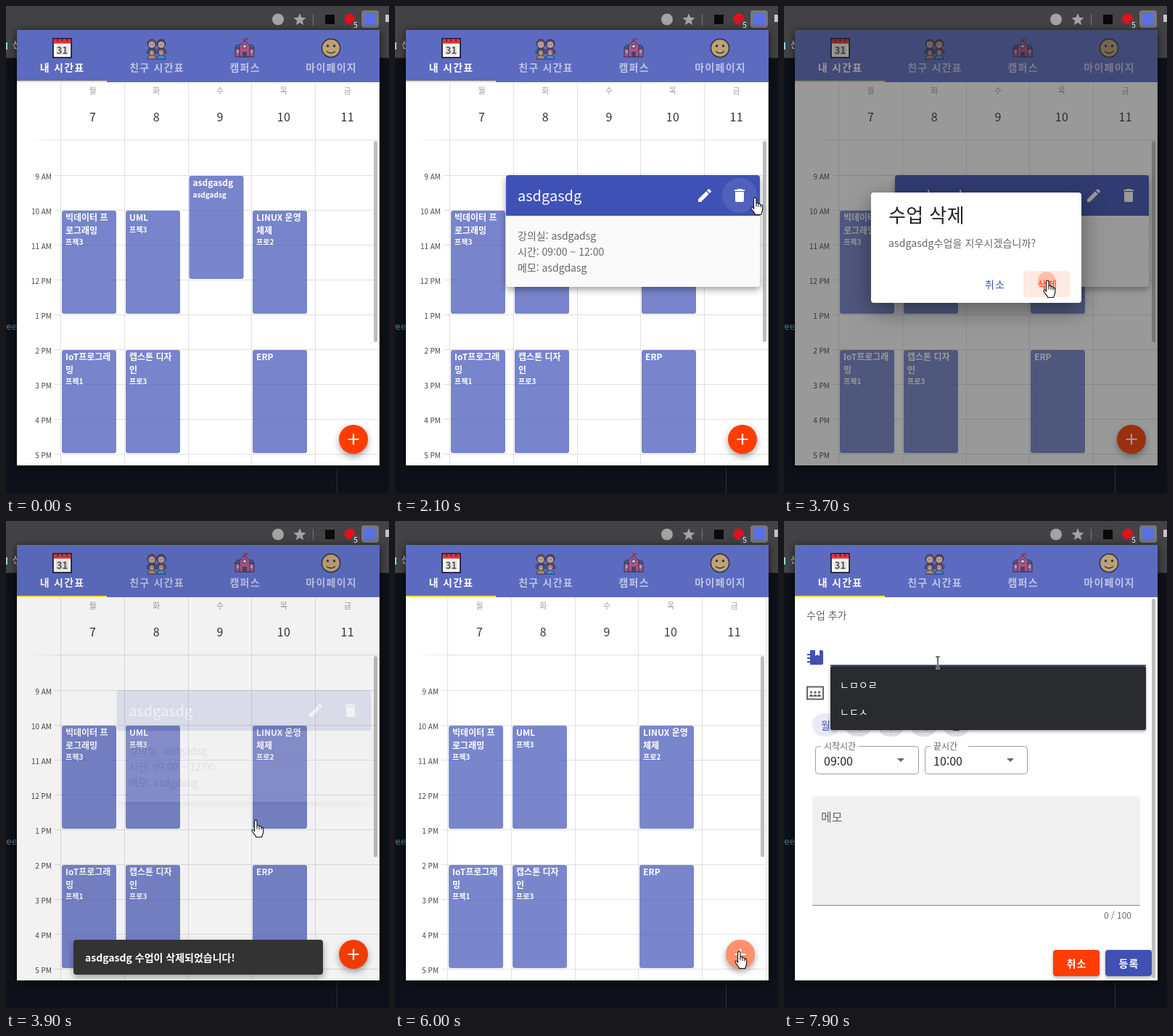
Write an HTML page that moves like this. It is 528x671 px and loops after 8 s.

```html
<!DOCTYPE html>
<html lang="ko">
<head>
<meta charset="utf-8">
<title>시간표</title>
<style>
  html, body { margin: 0; width: 100%; height: 100%; overflow: hidden; background: #0e1119; }
  svg { display: block; width: 528px; height: 671px; font-family: "Noto Sans CJK KR", "Noto Sans CJK JP", "Noto Sans", sans-serif; }
  text { white-space: pre; }
  .low { filter: drop-shadow(0 2px 2px rgba(0,0,0,.35)); }
  .mid { filter: drop-shadow(0 4px 5px rgba(0,0,0,.36)); }
  .high { filter: drop-shadow(0 10px 16px rgba(0,0,0,.42)); }
</style>
</head>
<body>
<svg id="stage" viewBox="0 0 528 671" xmlns="http://www.w3.org/2000/svg"></svg>
<script>
const LOOP = 8000, STEP = 100;
const BLUE = '#3f51b5', ORANGE = '#ff3d00';

// Markup helpers
const rect = (x, y, w, h, fill, more = '') =>
  `<rect x="${x}" y="${y}" width="${w}" height="${h}" fill="${fill}" ${more}/>`;
const circle = (x, y, r, fill, more = '') =>
  `<circle cx="${x}" cy="${y}" r="${r}" fill="${fill}" ${more}/>`;
const path = (d, fill, more = '') => `<path d="${d}" fill="${fill}" ${more}/>`;
const stroke = (d, color, width = 1, more = '') =>
  `<path d="${d}" fill="none" stroke="${color}" stroke-width="${width}" ${more}/>`;
const group = (inner, more = '') => `<g ${more}>${inner}</g>`;
// y is the optical middle of the line
const text = (s, x, y, size, fill, more = '') =>
  `<text x="${x}" y="${(y + size * 0.36).toFixed(2)}" font-size="${size}" fill="${fill}" ${more}>${s}</text>`;
const MID = 'text-anchor="middle"', END = 'text-anchor="end"', BOLD = 'font-weight="700"';

function browser() {
  const star = Array.from({ length: 10 }, (_, i) => {
    const a = i * Math.PI / 5 - Math.PI / 2, r = i % 2 ? 3.9 : 9;
    return `${(405 + r * Math.cos(a)).toFixed(1)} ${(19 + r * Math.sin(a)).toFixed(1)}`;
  }).join('L');
  return rect(0, 0, 528, 671, '#0e1119') +
    rect(0, 0, 528, 72, '#434345') + rect(0, 71, 528, 1, '#2a2a2c') +
    circle(375, 18.5, 8, '#a3a3a4') + path(`M${star}Z`, '#a3a3a4') +
    rect(423, 11, 1, 16, '#77777a') + rect(440, 12, 13, 13, '#0a0a0a') +
    circle(474, 18, 7.5, '#e3101c') + rect(476, 20, 12, 12, '#4a4a4d', 'rx="2"') +
    text('5', 482, 26, 10, '#fff', MID) +
    rect(490, 6, 24, 24, '#77787c', 'rx="4"') + rect(494, 10, 16, 16, '#5a70e6') +
    rect(523, 12, 6, 10, '#c4c4c4') +
    rect(0, 50, 2, 10, '#8fd0e8') + text('선', 9, 54, 12, '#f0f0f0') +
    `<text x="15" y="446" font-size="12" fill="#557f95" text-anchor="end" font-family="'Noto Sans Mono', monospace">wee</text>` +
    rect(456, 633, 1, 38, '#2b3040');
}

// Tab pictograms, each centred on 0,0
function calendarIcon() {
  return rect(-12, -13, 25, 26, '#fff', 'stroke="#111" stroke-width="1.6"') +
    rect(-11.2, -12.2, 23.4, 6, '#e8323c') +
    stroke('M-6 -14V-9M0.5 -14V-9M7 -14V-9', '#222', 1.2) +
    rect(-8, -3.5, 17, 13, '#e6e6e6') + text('31', 0.5, 3, 13, '#555', MID + ' ' + BOLD);
}
function familyIcon() {
  const head = (x, y, r, hair, skin, shirt) =>
    path(`M${x - r - 1} ${y + r * 2.2}q0 ${-r * 1.2} ${r + 1} ${-r * 1.2}t${r + 1} ${r * 1.2}z`, shirt, 'stroke="#111"') +
    circle(x, y, r, hair, 'stroke="#111"') + circle(x, y + 1.4, r - 1.6, skin) +
    path(`M${x - 2} ${y + 1}h1m2 0h1`, 'none', 'stroke="#111"');
  return head(-6.5, -6, 6, '#6b3a22', '#ffc27a', '#2f8f9d') +
    head(6.5, -6, 6, '#4a2a1c', '#ffc27a', '#c9433c') +
    head(-6.5, 5, 4.6, '#5b3320', '#ffc27a', '#e0a030') +
    head(6.5, 5, 4.6, '#8a4a20', '#ffc27a', '#3a9cd8');
}
function schoolIcon() {
  return rect(-13, 0, 26, 12, '#d8425a', 'stroke="#111"') +
    path('M-13 0L-11 -4H11L13 0Z', '#4a5a74', 'stroke="#111"') +
    path('M-7 12V-4L0 -10L7 -4V12Z', '#e4455a', 'stroke="#111"') +
    stroke('M0 -10V-14', '#111', 1.4) + rect(0, -14, 5, 3, '#e81224') +
    circle(0, -2.5, 2.6, '#fff', 'stroke="#111"') + rect(-3, 5, 6, 7, '#3b2a2a') +
    path('M-11 3h3v4h-3zM8 3h3v4h-3z', '#9fd8f4');
}
function smileIcon() {
  return circle(0, 0, 12.6, '#ffc83d', 'stroke="#111" stroke-width="1.6"') +
    circle(-4.5, -3, 1.8, '#111') + circle(4.5, -3, 1.8, '#111') +
    stroke('M-6 4.5Q0 9.5 6 4.5', '#111', 1.5);
}

function header() {
  const tabs = [['내 시간표', 77, calendarIcon], ['친구 시간표', 207.5, familyIcon],
                ['캠퍼스', 329, schoolIcon], ['마이페이지', 448, smileIcon]];
  return rect(15, 33, 500, 72, '#5c6bc0') + tabs.map(([name, x, icon], i) =>
    group(group(icon(), `transform="translate(${x} 58)"`) +
      text(name, x + 0.6, 84.5, 14, '#fff', `${MID} ${BOLD} letter-spacing="1.25"`),
      `opacity="${i ? 0.6 : 1}"`)).join('') +
    rect(15, 103, 124, 2, '#ffeb3b');
}

function lesson(x, y, lines, sub) {
  return rect(x, y, 75, 142, BLUE, 'rx="3" fill-opacity=".7"') +
    lines.map((s, i) => text(s, x + 5, y + 9.5 + i * 18, 12, '#fff', BOLD)).join('') +
    text(sub, x + 5, y + 8.5 + lines.length * 17.5, 10, '#fff', BOLD);
}

function timetable() {
  const cols = [75.5, 163.5, 251.5, 338.5, 426.5, 514.5];
  const hours = ['9 AM', '10 AM', '11 AM', '12 PM', '1 PM', '2 PM', '3 PM', '4 PM', '5 PM'];
  let s = cols.map(x => stroke(`M${x} 106V633`, '#e0e0e0')).join('');
  s += stroke('M75 184.5H515', '#e0e0e0') + rect(31, 184, 44, 1, 'url(#fade)');
  s += [...'월화수목금'].map((d, i) =>
    text(d, 119.5 + i * 87.8, 117.5, 11, '#9e9e9e', MID) +
    text(7 + i, 119.5 + i * 87.8, 153.5, 16, '#333', MID + ' letter-spacing=".3"')).join('');
  s += hours.map((h, i) => stroke(`M67 ${233.5 + i * 48}H515`, '#e0e0e0') +
    text(h, 63, 235 + i * 48, 10, '#424242', END)).join('');
  s += lesson(77, 282, ['빅데이터 프', '로그래밍'], '프젝3') +
    lesson(165, 282, ['UML'], '프젝3') +
    lesson(340, 282, ['LINUX 운영', '체제'], '프로2') +
    lesson(77, 474, ['IoT프로그래', '밍'], '프젝1') +
    lesson(165, 474, ['캡스톤 디자', '인'], '프로3') +
    lesson(340, 474, ['ERP'], '') +
    group(lesson(252.5, 234, ['asdgasdg'], 'asdgadsg'), 'id="doomed"');
  s += rect(507, 186, 5, 277, '#bdbdbd', 'rx="2.5"');
  s += group(circle(479, 597, 20, ORANGE), 'class="mid"') +
    circle(479, 597, 20, '#fff', 'id="fabGlow"') +
    stroke('M471.5 597H486.5M479 589.5V604.5', '#fff', 2.2);
  return s;
}

function card() {
  return group(rect(153, 233, 350, 154, '#fafafa', 'rx="4"') +
      path('M153 289V237a4 4 0 0 1 4-4H499a4 4 0 0 1 4 4V289Z', BLUE), 'class="mid"') +
    circle(475, 261, 24, '#fff', 'id="binHover" fill-opacity=".09"') +
    text('asdgasdg', 169, 262, 20, '#fff') +
    path('M418 266.2V270h3.8L432.8 259l-3.8-3.8ZM430 254.2l3.8 3.8 1.9-1.9q.6-.7 0-1.3l-2.5-2.5q-.6-.6-1.3 0Z', '#fff') +
    path('M469 268a2 2 0 0 0 2 2h8a2 2 0 0 0 2-2V256H469ZM482 253h-3.5l-1-1h-5l-1 1H468v2h14Z', '#fff') +
    ['강의실: asdgadsg', '시간: 09:00 ~ 12:00', '메모: asdgdasg']
      .map((s, i) => text(s, 169, 317 + i * 22, 14, '#666')).join('');
}

function dialog() {
  return group(rect(120, 257, 290, 152, '#fff', 'rx="4"'), 'class="high"') +
    text('수업 삭제', 144, 289, 26, '#212121', 'letter-spacing=".4"') +
    text('asdgasdg수업을 지우시겠습니까?', 144, 327, 14, '#666', 'letter-spacing=".1"') +
    text('취소', 277, 384, 14, BLUE, 'font-weight="500" letter-spacing="1.25"') +
    rect(330, 365, 64, 36, ORANGE, 'id="okHover" rx="4" fill-opacity=".11"') +
    text('삭제', 349, 384, 14, ORANGE, 'font-weight="500" letter-spacing="1.25"') +
    circle(362, 378, 12, ORANGE, 'id="okRipple" fill-opacity=".25"');
}

function snackbar() {
  return group(rect(93, 577, 344, 48, '#333', 'rx="4"'), 'class="mid"') +
    text('asdgasdg 수업이 삭제되었습니다!', 109, 602, 14, '#fff', BOLD);
}

function select(x, w, label, value) {
  return rect(x + 0.5, 310.5, w, 38, '#fff', 'rx="4" stroke="#9e9e9e"') +
    rect(x + 8, 309, 52, 4, '#fff') + text(label, x + 12, 311, 12, '#666') +
    text(value, x + 12, 331, 16, '#222') +
    path(`M${x + 113} 327h10l-5 5z`, '#666');
}

function button(x, fill, label) {
  return group(rect(x, 591, 64, 36, fill, 'rx="4"'), 'class="low"') +
    text(label, x + 32.6, 609.5, 14, '#fff', `${MID} ${BOLD} letter-spacing="1.25"`);
}

function form() {
  const chips = [...'월화수목금'].map((d, i) => {
    const x = 57.5 + i * 45;
    return rect(x - 18.5, 265, 37, 32, i ? '#e0e0e0' : '#e8eaf6', 'rx="16"') +
      text(d, x, 281.5, 14, i ? '#444' : BLUE, MID);
  }).join('');
  const book = path('M36 178H52a2 2 0 0 1 2 2V196a2 2 0 0 1-2 2H36v-3h-4v-2h4v-3h-4v-2h4v-3h-4v-2h4ZM43 178v8l3-2 3 2v-8Z',
    '#666', 'id="book" fill-rule="evenodd"');
  const room = rect(32, 228.5, 22, 17, 'none', 'stroke="#666" stroke-width="2"') +
    [37.5, 43, 48.5].map(x => circle(x, 236, 1.7, '#666') +
      path(`M${x - 2.6} 242q0-3 2.6-3t2.6 3z`, '#666')).join('');
  return text('수업 추가', 31, 130, 14, '#666') + book + room +
    group(text('수업명(필수)', 64, 188, 16, '#666'), 'id="hint"') +
    rect(64, 199, 435, 1, '#949494') + text('0 / 10', 499, 209.5, 12, '#666', END) +
    text('강의실', 64, 237, 16, '#666') +
    rect(64, 247, 435, 1, '#949494') + text('0 / 10', 499, 257.5, 12, '#666', END) +
    chips + select(43, 142, '시작시간', '09:00') + select(194, 141, '끝시간', '10:00') +
    path('M39 529V383a4 4 0 0 1 4-4H487a4 4 0 0 1 4 4V529Z', '#f0f0f0') +
    rect(39, 529, 452, 1, '#8c8c8c') + text('메모', 51, 408, 16, '#666') +
    text('0 / 100', 479, 544, 12, '#666', END) +
    button(371, ORANGE, '취소') + button(443, BLUE, '등록') +
    rect(507, 107, 5, 523, '#bdbdbd', 'rx="2.5"') +
    rect(64, 198, 435, 2, BLUE, 'id="focusLine"') +
    group(group(rect(64, 200, 435, 88, '#2a2b2e', 'rx="2"'), 'class="low"') +
      text('ㄴㅁㅇㄹ', 77, 226, 14, '#fff') + text('ㄴㄷㅅ', 77, 263, 14, '#fff'), 'id="options"');
}

function pointer() {
  const ink = 'stroke="#111" stroke-width="1.1" stroke-linejoin="round"';
  const beam = 'M-3 -8h2l1 1 1 -1h2M0 -7V7M-3 8h2l1 -1 1 1h2';
  return path('M0 0V16.5L3.8 13L6.3 19L9 17.8L6.5 12H11.5Z', '#fff', ink + ' id="arrow"') +
    group(path('M4.6 2.3a1.7 1.7 0 0 1 3.4 0V9.2a1.5 1.5 0 0 1 3 .2v1a1.5 1.5 0 0 1 3 .3v1a1.4 1.4 0 0 1 2.7.5V17c0 3-1.9 4-1.9 7H6.6c0-3-4.8-6-5.6-8.8-.4-1.8 1.6-2.3 2.4-1L4.6 16Z', '#fff', ink) +
      stroke('M8 9.5V13M11 11V13.5M14 12V14', '#111'), 'id="hand" transform="translate(-6 -.5)"') +
    group(stroke(beam, '#fff', 2.5) + stroke(beam, '#111', 1.2), 'id="beam"');
}

const stage = document.getElementById('stage');
stage.innerHTML =
  `<defs><clipPath id="view"><rect x="15" y="105" width="500" height="528"/></clipPath>
   <linearGradient id="fade"><stop offset="0" stop-color="#fff"/><stop offset="1" stop-color="#e0e0e0"/></linearGradient></defs>` +
  browser() +
  group(rect(15, 33, 500, 600, '#fff'), 'style="filter:drop-shadow(0 2px 6px rgba(0,0,0,.7))"') +
  group(group(timetable(), 'id="table"') + group(form(), 'id="form"'), 'clip-path="url(#view)"') +
  header() +
  group(card(), 'id="card"') +
  rect(15, 33, 500, 600, '#212121', 'id="shade"') +
  group(dialog(), 'id="dialog"') + group(snackbar(), 'id="snack"') +
  group(pointer(), 'id="cursor"');

const el = {};
stage.querySelectorAll('[id]').forEach(n => el[n.id] = n);

// Motion helpers
const ramp = (t, a, b) => Math.min(1, Math.max(0, (t - a) / (b - a)));
const during = (t, a, b) => t >= a && t < b;
const fade = (node, o) => {
  node.setAttribute('opacity', o);
  node.style.display = o > 0 ? '' : 'none';
};
const show = (node, on) => fade(node, on ? 1 : 0);
const place = (node, x, y) => node.setAttribute('transform', `translate(${x} ${y})`);
const zoom = (node, x, y, k) =>
  node.setAttribute('transform', `translate(${x} ${y}) scale(${k}) translate(${-x} ${-y})`);

function bezier(x1, y1, x2, y2) {
  const at = (s, a, b) => 3 * s * (1 - s) ** 2 * a + 3 * s * s * (1 - s) * b + s ** 3;
  return x => {
    let lo = 0, hi = 1;
    for (let i = 0; i < 24; i++) {
      const m = (lo + hi) / 2;
      if (at(m, x1, x2) < x) lo = m; else hi = m;
    }
    return x <= 0 ? 0 : x >= 1 ? 1 : at(lo, y1, y2);
  };
}
const ease = bezier(0.25, 0.1, 0.25, 1);
const leave = bezier(1, 0.5, 0.8, 1);

// time, hotspot x, hotspot y, shape
const track = [
  [300, 364, 318, 'hand'], [500, 335, 323, 'arrow'], [600, 305, 312, 'hand'], [800, 260, 285, 'hand'],
  [900, 268, 258, 'hand'], [1100, 290, 298, 'hand'], [1300, 290, 298, 'arrow'], [1600, 290, 298, 'arrow'],
  [1900, 425, 280, 'arrow'], [2000, 472, 270, 'hand'], [2100, 496, 264, 'hand'], [2200, 496, 264, 'hand'],
  [2400, 486, 263, 'hand'], [2600, 486, 263, 'arrow'], [3000, 390, 360, 'arrow'], [3300, 363, 378, 'hand'],
  [3700, 363, 378, 'hand'], [3900, 344, 412, 'hand'], [4000, 336, 424, 'arrow'], [4400, 323, 436, 'arrow'],
  [4500, 323, 436, 'arrow'], [4900, 463, 545, 'arrow'], [5000, 470, 585, 'hand'], [5100, 474, 593, 'hand'],
  [6000, 474, 593, 'hand'], [6100, 463, 545, 'arrow'], [6500, 291, 294, 'arrow'], [6600, 257, 214, 'arrow'],
  [7000, 222, 205, 'arrow'], [7200, 212, 195, 'beam']
];

function moveCursor(t) {
  show(el.cursor, t >= track[0][0]);
  let i = 0;
  while (i < track.length - 1 && track[i + 1][0] <= t) i++;
  const a = track[i], b = track[i + 1] || a;
  const p = b === a ? 0 : ramp(t, a[0], b[0]);
  place(el.cursor, a[1] + (b[1] - a[1]) * p, a[2] + (b[2] - a[2]) * p);
  for (const shape of ['arrow', 'hand', 'beam']) show(el[shape], a[3] === shape);
}

function draw(t) {
  const closing = 1 - ramp(t, 3700, 3930);

  // Lesson card
  fade(el.card, ramp(t, 1100, 1400) * closing);
  show(el.binHover, during(t, 2000, 2600));
  show(el.doomed, t < 3800);

  // Confirm dialog
  const open = ease(ramp(t, 2530, 2830));
  fade(el.shade, 0.46 * open * closing);
  fade(el.dialog, open * (1 - ramp(t, 3700, 3880)));
  zoom(el.dialog, 265, 333, 0.5 + 0.5 * open);
  show(el.okHover, t >= 3200);
  show(el.okRipple, t >= 3700);

  // Snackbar
  const pop = ramp(t, 3750, 3900);
  fade(el.snack, pop * (1 - ramp(t, 5650, 5800)));
  zoom(el.snack, 265, 601, 0.8 + 0.2 * pop);

  // Page switch
  fade(el.fabGlow, t < 5000 ? 0 : 0.08 + 0.34 * ramp(t, 5800, 6000));
  const out = leave(ramp(t, 5980, 6500)), into = ease(ramp(t, 6519, 6819));
  place(el.table, -150 * out, 0);
  fade(el.table, 1 - out);
  place(el.form, -150 * (1 - into), 0);
  fade(el.form, into);

  // Field focus
  const focused = t >= 7400;
  el.book.setAttribute('fill', focused ? BLUE : '#666');
  show(el.options, focused);
  fade(el.hint, 1 - ramp(t, 7350, 7550));
  zoom(el.focusLine, 281.5, 199, ease(ramp(t, 7350, 7650)));

  moveCursor(t);
}

const start = performance.now();
function tick(now) {
  const t = Math.max(0, now - start) % LOOP;
  draw(Math.floor(t / STEP) * STEP);
  requestAnimationFrame(tick);
}
draw(0);
requestAnimationFrame(tick);
</script>
</body>
</html>
```
